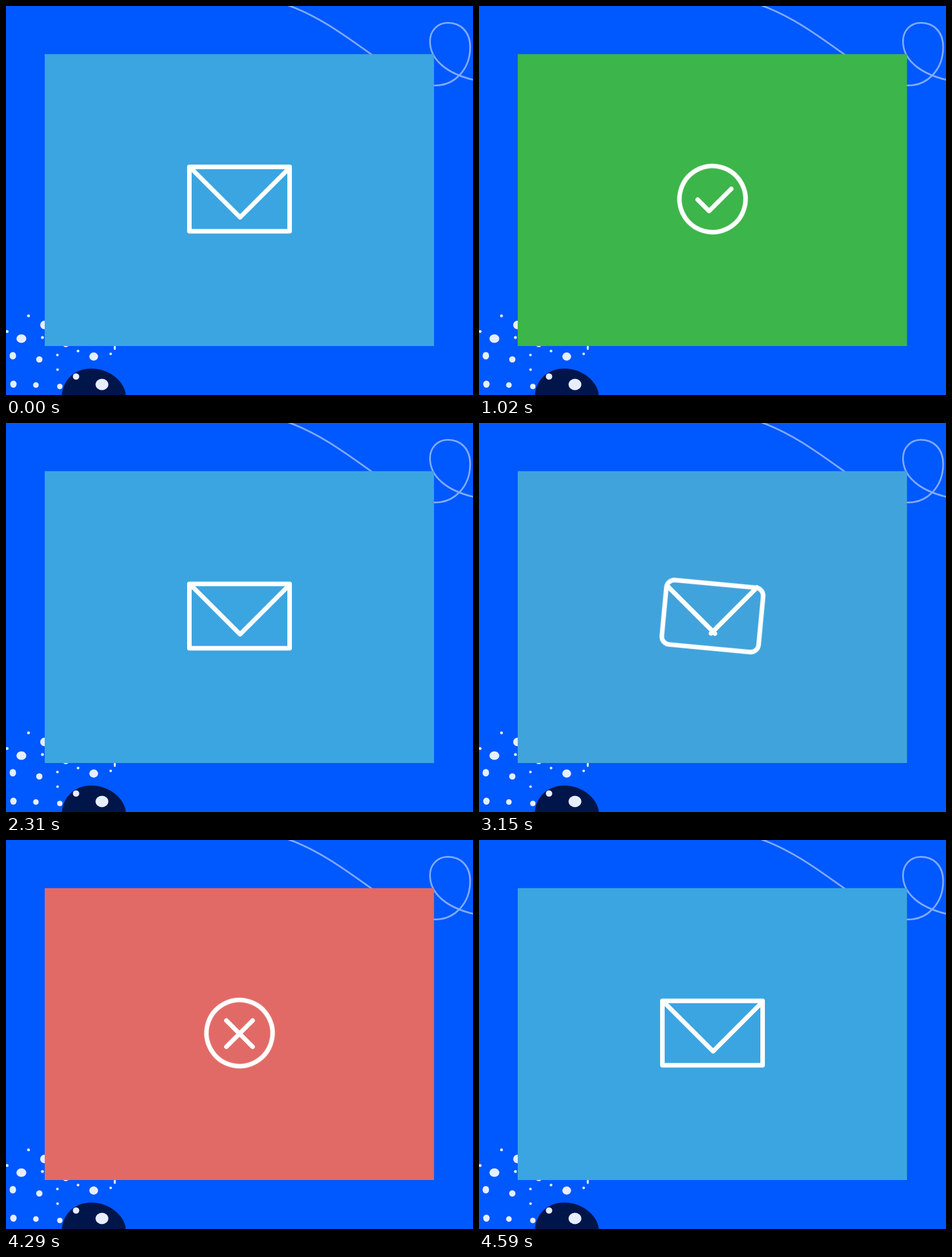
An HTML page without scripts for the animation above (4.68 s loop, 820 px wide and 683 px high).

```html
<!DOCTYPE html>
<html lang="en">
<head>
<meta charset="utf-8">
<title>Envelope morph</title>
<style>
  html, body { margin: 0; width: 100%; height: 100%; overflow: hidden; background: #0058ff; }
  svg { display: block; width: 100%; height: 100%; }

  .swirl { fill: none; stroke: #80abff; stroke-width: 3; }
  .dots { fill: #e6eeff; }
  .icon { fill: none; stroke: #fff; stroke-width: 8; stroke-linecap: round; stroke-linejoin: round; }

  .card, .frame, .mark { animation: 4680ms ease-in infinite; }
  .card { animation-name: tint; }
  .frame { animation-name: outline; }
  .mark { animation-name: strokes; }

  /* envelope > check > envelope > cross > envelope */
  @keyframes tint {
    0%, 14.744%, 49.359%, 66.026%, 98.077%, 100% { fill: #3ba5e1; }
    19.872%, 20.513% { fill: #38abd0; animation-timing-function: ease-out; }
    21.795%, 43.59% { fill: #3cb54a; }
    46.474% { fill: #3caf86; animation-timing-function: ease-out; }
    68.59% { fill: #4f9ed2; animation-timing-function: ease-out; }
    70.513%, 91.667% { fill: #e26a66; }
    94.872%, 95.513% { fill: #a38297; animation-timing-function: ease-out; }
  }

  @keyframes outline {
    0%, 14.744%, 49.359%, 66.026%, 98.077%, 100% {
      x: -88px; y: -56.5px; width: 176px; height: 113px; rx: 0.1px; transform: rotate(0deg);
    }
    19.872%, 20.513%, 68.59% {
      x: -79.8px; y: -57px; width: 159.6px; height: 114px; rx: 43px; transform: rotate(16.5deg);
      animation-timing-function: ease-out;
    }
    21.795%, 43.59%, 70.513%, 91.667% {
      x: -58px; y: -58px; width: 116px; height: 116px; rx: 58px; transform: rotate(60deg);
    }
    46.474%, 94.872%, 95.513% {
      x: -80.8px; y: -57px; width: 161.6px; height: 114px; rx: 41.5px; transform: rotate(15.8deg);
      animation-timing-function: ease-out;
    }
  }

  @keyframes strokes {
    0%, 14.744%, 49.359%, 66.026%, 98.077%, 100% { d: path("M323 283L411 371M498 284L411 371"); }
    19.872%, 20.513% { d: path("M355 313L408 366M473 301L408 366"); animation-timing-function: ease-out; }
    21.795%, 43.59% { d: path("M384 340L404 360M443 321L404 360"); }
    46.474% { d: path("M343 302L409 367M480 296L409 367"); animation-timing-function: ease-out; }
    68.59% { d: path("M353 299L421 367M467 299L400 366"); animation-timing-function: ease-out; }
    70.513%, 91.667% { d: path("M387 317L433 363M433 317L387 363"); }
    94.872%, 95.513% { d: path("M344 294L417 368M487 295L415 367"); animation-timing-function: ease-out; }
  }
</style>
</head>
<body>
<svg viewBox="0 0 820 683">
  <rect width="820" height="683" fill="#0058ff"/>

  <g class="swirl">
    <path d="M496 -1C550 18 598 54 643 86"/>
    <path d="M745 139C788 144 815 110 815 72C815 45 798 29.5 776 29.5C757 29.5 744.5 44 744.5 62C744.5 95 775 119 822 130"/>
  </g>

  <path fill="#00164a" d="M98 684C100 655 122 636.5 150 636.5C182 636.5 209 660 210.5 684Z"/>
  <g class="dots">
    <circle cx="39.5" cy="544" r="2.5"/>
    <circle cx="67.5" cy="560" r="7.5"/>
    <circle cx="2" cy="571.5" r="2.5"/>
    <ellipse cx="27" cy="584" rx="8.7" ry="7.6"/>
    <circle cx="64" cy="582" r="2.6"/>
    <ellipse cx="12" cy="614" rx="5.7" ry="6.6"/>
    <circle cx="58.5" cy="620.5" r="5.5"/>
    <circle cx="90.3" cy="612.7" r="2.3"/>
    <circle cx="126.5" cy="605.8" r="2.4"/>
    <ellipse cx="154" cy="615.5" rx="7.7" ry="7.2"/>
    <circle cx="183.8" cy="610.8" r="2.3"/>
    <ellipse cx="191" cy="600" rx="1.8" ry="4"/>
    <ellipse cx="105" cy="595" rx="5" ry="4"/>
    <circle cx="90.5" cy="638.5" r="2.3"/>
    <ellipse cx="13" cy="664" rx="5.6" ry="6.2"/>
    <circle cx="52.5" cy="665.5" r="4.9"/>
    <circle cx="94.5" cy="668" r="4.8"/>
    <circle cx="123" cy="650.5" r="5.6"/>
    <ellipse cx="168.5" cy="664.5" rx="11.2" ry="10"/>
  </g>

  <rect class="card" x="68" y="84.5" width="683.5" height="512.5" fill="#3ba5e1"/>
  <g class="icon">
    <g transform="translate(410 339)">
      <rect class="frame" x="-88" y="-56.5" width="176" height="113"/>
    </g>
    <path class="mark" d="M323 283L411 371M498 284L411 371"/>
  </g>
</svg>
</body>
</html>
```
